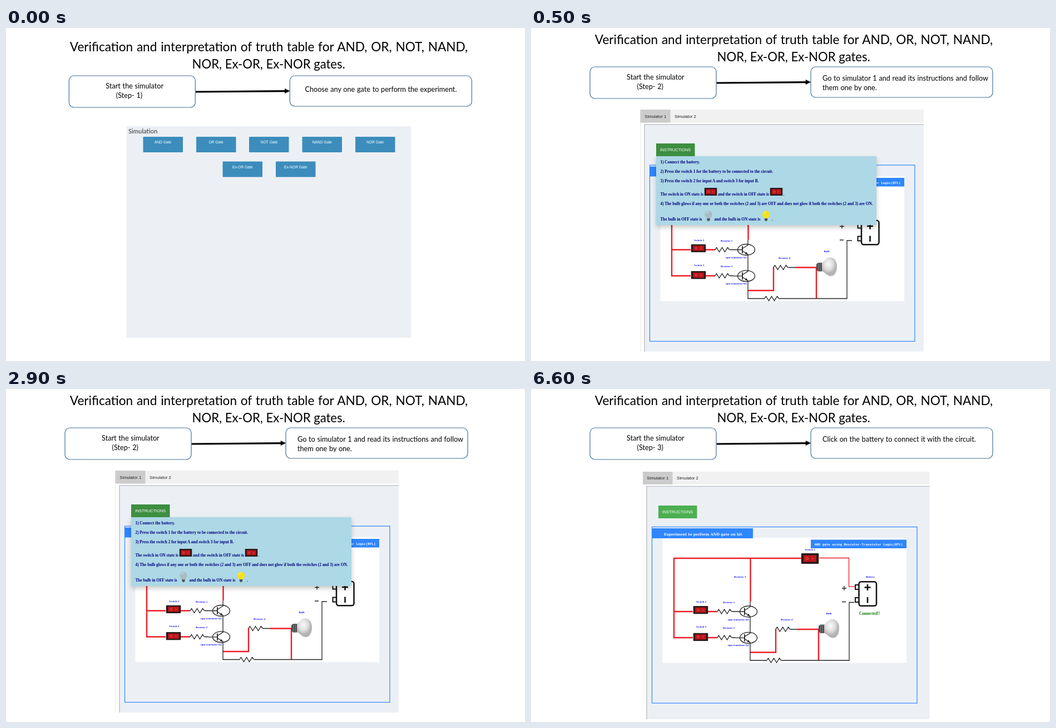
An HTML page that plays this animation: 933 px wide and 600 px high, repeating every 8000 ms.

```html
<!DOCTYPE html>
<html lang="en">
<head>
<meta charset="utf-8">
<title>Logic gate simulator steps</title>
<style>
  html, body { margin: 0; width: 100%; height: 100%; overflow: hidden; background: #fff; }
  svg { display: block; width: 100%; height: 100%; font-variant-ligatures: none; }

  .scene { visibility: hidden; animation: 8s step-end infinite; }
  #choose { animation-name: first; }
  #read { animation-name: second; }
  #connect { animation-name: third; }
  @keyframes first { 0% { visibility: visible; } 6.25%, 100% { visibility: hidden; } }
  @keyframes second { 0% { visibility: hidden; } 6.25% { visibility: visible; } 56.25%, 100% { visibility: hidden; } }
  @keyframes third { 0% { visibility: hidden; } 56.25%, 100% { visibility: visible; } }

  .title { font: 22.6px Lato, sans-serif; word-spacing: 1px; text-anchor: middle; }
  .title.short { font-size: 22.1px; word-spacing: 0; }
  .step { font: 12.65px Lato, sans-serif; word-spacing: .5px; }
  .mid { text-anchor: middle; }
  .box { fill: #fff; stroke: #41719c; stroke-width: 1.2; }
  .gate rect { fill: #3c8dbc; }
  .gate text { font: 6.7px "Liberation Sans", sans-serif; fill: #fff; text-anchor: middle; }
  .tab { font: 7.7px "Liberation Sans", sans-serif; fill: #222; }
  .button { font: 7.35px "Liberation Sans", sans-serif; fill: #fff; }
  .label { font: bold 5px "Liberation Serif", serif; fill: #1414ff; }
  .help { font: bold 7.27px "Liberation Serif", serif; fill: #000080; }
  .red, .thin, .black { fill: none; stroke: #ee1c25; stroke-width: 2.4; }
  .thin { stroke-width: 1.3; }
  .black { stroke: #222; stroke-width: 1.3; }
</style>
</head>
<body>
<svg viewBox="0 0 933 600">
  <defs>
    <radialGradient id="glass" cx=".45" cy=".35">
      <stop offset="0" stop-color="#fafafa"/><stop offset=".6" stop-color="#dedede"/><stop offset="1" stop-color="#b4b4b4"/>
    </radialGradient>
    <clipPath id="readClip"><rect x="200.5" y="148.5" width="509.5" height="436"/></clipPath>
    <clipPath id="connectClip"><rect x="201" y="149" width="515.5" height="446"/></clipPath>
    <filter id="shadow" x="-5%" y="-10%" width="110%" height="125%">
      <feDropShadow dx="0" dy="4" stdDeviation="4" flood-opacity=".22"/>
    </filter>

    <g id="heading">
      <text class="title" x="472.5" y="42">Verification and interpretation of truth table for AND, OR, NOT, NAND,</text>
      <text class="title short" x="472.2" y="73">NOR, Ex-OR, Ex-NOR gates.</text>
    </g>

    <g id="flow">
      <rect class="box" x="113.3" y="86" width="227" height="57" rx="9"/>
      <rect class="box" x="510.3" y="86" width="327" height="55" rx="9"/>
      <path d="M341 115L503 113.6" stroke="#000" stroke-width="3.2"/>
      <path d="M501 109L510.5 113.5L501 118z"/>
      <text class="step mid" x="231.2" y="108.5">Start the simulator</text>
    </g>

    <symbol id="switch" viewBox="0 0 32 19" preserveAspectRatio="none">
      <rect width="32" height="19" rx="1.5" fill="#2a1a1a"/>
      <rect x="4.5" y="3.5" width="23" height="12" fill="#c0161b"/>
      <path d="M16 3.5V15.5" stroke="#980f14"/>
      <circle cx="11" cy="9.5" r="2" fill="none" stroke="#e0605c"/>
      <path d="M19 9.5h4" stroke="#e0605c"/>
    </symbol>

    <g id="smallBulb">
      <circle cx="8" cy="6.5" r="6.8"/>
      <path d="M4 10h8l-1.5 4h-5z"/>
      <path d="M5.3 13.5h5.4v3l-1.7 2h-2l-1.7-2z" fill="#55585c"/>
      <path d="M4.5 5q1-3 4-3" fill="none" stroke="#fff" stroke-opacity=".7"/>
    </g>

    <g id="transistor">
      <ellipse class="black" rx="15.5" ry="10"/>
      <path class="black" d="M-23 0H-7M-7-2L3-8.5V-10M-7 2L3 8.5V10"/>
      <path d="M-7-6.5V6.5" stroke="#222" stroke-width="1.8"/>
      <path d="M3 8.5L-2.5 7.5L0 3.8z" fill="#222"/>
    </g>

    <path id="zigzag" class="black" d="M0 0l2.5-4l5 8l5-8l5 8l5-8l3 4"/>

    <g id="battery">
      <rect x="589.5" y="347.2" width="31.5" height="43.5" rx="4" fill="#fff" stroke="#111" stroke-width="2.5"/>
      <path d="M589 353H583V361H589M589 376H583V384H589" fill="none" stroke="#111" stroke-width="2"/>
      <path d="M599.5 357.5h11M605 352v11M605 375v10.5" stroke="#111" stroke-width="2.6"/>
    </g>

    <g id="panel">
      <rect x="196" y="145" width="530" height="460" fill="#fff"/>
      <rect x="196" y="145" width="530" height="27" fill="#f1f1f1"/>
      <rect x="196" y="145" width="58.5" height="27" fill="#ccc"/>
      <path d="M200.8 172V605" stroke="#ddd"/>
      <rect x="207.5" y="175" width="520" height="430" fill="#ecf0f5"/>
      <path d="M208 605V175.3H728" fill="none" stroke="#b9bcc0" stroke-width="1.3"/>
      <text class="tab" x="208.3" y="163.3">Simulator 1</text>
      <text class="tab" x="262" y="163.3">Simulator 2</text>
      <rect x="217.5" y="248.5" width="476.5" height="317.5" fill="none" stroke="#2f86ff" stroke-width="1.2"/>
      <rect x="236.5" y="268" width="438.5" height="225.5" fill="#fff"/>
      <rect x="217.5" y="251" width="181.5" height="18" fill="#2f86ff"/>
      <text x="239" y="263.5" fill="#fff" style="font:bold 6.35px 'DejaVu Serif',serif">Experiment to perform AND gate on kit</text>
      <rect x="503" y="271.5" width="172" height="15.5" fill="#2f86ff"/>
      <text x="509.5" y="282" fill="#fff" style="font:bold 5.9px 'Liberation Mono',monospace">AND gate using Resistor-Transistor Logic(RTL)</text>

      <path class="red" d="M486 305H257V448H291M257 401H291M394.5 305V383M318 401H335M318 448H335M394 474.5H440V432M479 433H517V489"/>
      <path class="thin" d="M518 304.5H571.5V356"/>
      <path class="black" d="M394 383V392M394 411V439M394 458V489H424M450 489H572V384.5H581M361 401H368M361 448H368M466 433H479"/>
      <use href="#zigzag" x="335" y="401"/>
      <use href="#zigzag" x="335" y="448"/>
      <use href="#zigzag" x="440" y="433"/>
      <use href="#zigzag" x="424" y="489"/>
      <use href="#transistor" x="391" y="401"/>
      <use href="#transistor" x="391" y="448.3"/>
      <use href="#switch" x="485.5" y="296" width="32" height="19"/>
      <use href="#switch" x="291.5" y="391" width="27" height="14.5"/>
      <use href="#switch" x="291.5" y="439.5" width="27" height="14.5"/>

      <path d="M526 425C532 423 533 415 542 415C550 415 554 423 554 431C554 441 550 448.500 543 448.500C535 448.500 533 441 526 439.500z" fill="url(#glass)"/>
      <path d="M517 427L520 424.5H527V440H520L517 437z" fill="#4b4b4d"/>
      <path d="M520.5 425V440M524 425V440" stroke="#8a8a8c"/>

      <path d="M559 359h8M563 355v8M559 383.5h7" stroke="#222" stroke-width="1.3"/>
      <g class="label">
        <text x="492.5" y="291">Switch 1</text>
        <text x="297" y="385">Switch 2</text>
        <text x="297" y="430">Switch 3</text>
        <text x="345" y="386">Resistor 1</text>
        <text x="345" y="432.3">Resistor 2</text>
        <text x="365" y="340">Resistor 3</text>
        <text x="449" y="417">Resistor 4</text>
        <text x="354" y="416.5">npn transistor Q1</text>
        <text x="354" y="463.3">npn transistor Q2</text>
        <text x="530.5" y="405.5">Bulb</text>
        <text x="602" y="340.3">Battery</text>
      </g>
    </g>
  </defs>

  <g id="choose" class="scene">
    <use href="#heading"/>
    <use href="#flow"/>
    <text class="step mid" x="221.5" y="126">(Step- 1)</text>
    <text class="step" x="537.5" y="115">Choose any one gate to perform the experiment.</text>
    <rect x="216.5" y="177" width="512" height="381" fill="#ecf0f5"/>
    <text x="220" y="190" fill="#333" style="font:11.3px Lato,sans-serif">Simulation</text>
    <g class="gate">
      <rect x="246.5" y="196" width="71.5" height="28" rx="1"/><text x="282" y="208.3">AND Gate</text>
      <rect x="342" y="196" width="71.5" height="28" rx="1"/><text x="377.6" y="208.3">OR Gate</text>
      <rect x="437" y="196" width="71.5" height="28" rx="1"/><text x="473" y="208.3">NOT Gate</text>
      <rect x="532.5" y="196" width="71.5" height="28" rx="1"/><text x="568.2" y="208.3">NAND Gate</text>
      <rect x="628" y="196" width="71.5" height="28" rx="1"/><text x="663.6" y="208.3">NOR Gate</text>
      <rect x="389.5" y="240.5" width="71.5" height="28" rx="1"/><text x="425.3" y="253">Ex-OR Gate</text>
      <rect x="485" y="240.5" width="71.5" height="28" rx="1"/><text x="520.7" y="253">Ex-NOR Gate</text>
    </g>
  </g>

  <g id="read" class="scene">
    <use href="#heading" y="-12.7"/>
    <use href="#flow" x="-7.3" y="-16"/>
    <text class="step mid" x="214.3" y="110">(Step- 2)</text>
    <text class="step" x="524" y="95">Go to simulator 1 and read its instructions and follow</text>
    <text class="step" x="524" y="112">them one by one.</text>
    <g transform="translate(-4 -1.5)">
      <g clip-path="url(#readClip)"><use href="#panel"/></g>
      <use href="#battery" x="8.5" y="1"/>
    </g>
    <rect x="225" y="231" width="396" height="124" fill="#add8e6" filter="url(#shadow)"/>
    <rect x="225" y="208" width="69.5" height="23" fill="#3e8e41"/>
    <text class="button" x="232" y="222.3">INSTRUCTIONS</text>
    <g class="help">
      <text x="232.5" y="243.5">1) Connect the battery.</text>
      <text x="232.5" y="260.5">2) Press the switch 1 for the battery to be connected to the circuit.</text>
      <text x="232.5" y="277.5">3) Press the switch 2 for input A and switch 3 for input B.</text>
      <text x="232.5" y="301.5">The switch in ON state is</text>
      <text x="336" y="301.5">and the switch in OFF state is</text>
      <text x="453.5" y="301.5">.</text>
      <text x="232.5" y="318.7">4) The bulb glows if any one or both the switches (2 and 3) are OFF and does not glow if both the switches (2 and 3) are ON.</text>
      <text x="232.5" y="347.3">The bulb in OFF state is</text>
      <text x="329.5" y="347.3">and the bulb in ON state is</text>
      <text x="433" y="347.3">.</text>
    </g>
    <use href="#switch" x="311.5" y="288" width="23" height="14"/>
    <use href="#switch" x="429.5" y="288" width="23" height="14"/>
    <use href="#smallBulb" x="311" y="329.5" fill="#a9bcc6"/>
    <use href="#smallBulb" x="414.5" y="329.5" fill="#f3e11c"/>
  </g>

  <g id="connect" class="scene">
    <use href="#heading" y="-12.7"/>
    <use href="#flow" x="-7.3" y="-16"/>
    <text class="step mid" x="214.3" y="110">(Step- 3)</text>
    <text class="step" x="524" y="95">Click on the battery to connect it with the circuit.</text>
    <g clip-path="url(#connectClip)"><use href="#panel"/></g>
    <path class="thin" d="M571 356H583"/>
    <use href="#battery"/>
    <text x="590" y="407" fill="#0a7a0a" style="font:bold 7.2px 'Liberation Serif',serif">Connected!!</text>
    <rect x="229" y="210" width="69.5" height="23" fill="#4caf50"/>
    <text class="button" x="236" y="224.3">INSTRUCTIONS</text>
  </g>
</svg>
</body>
</html>
```
